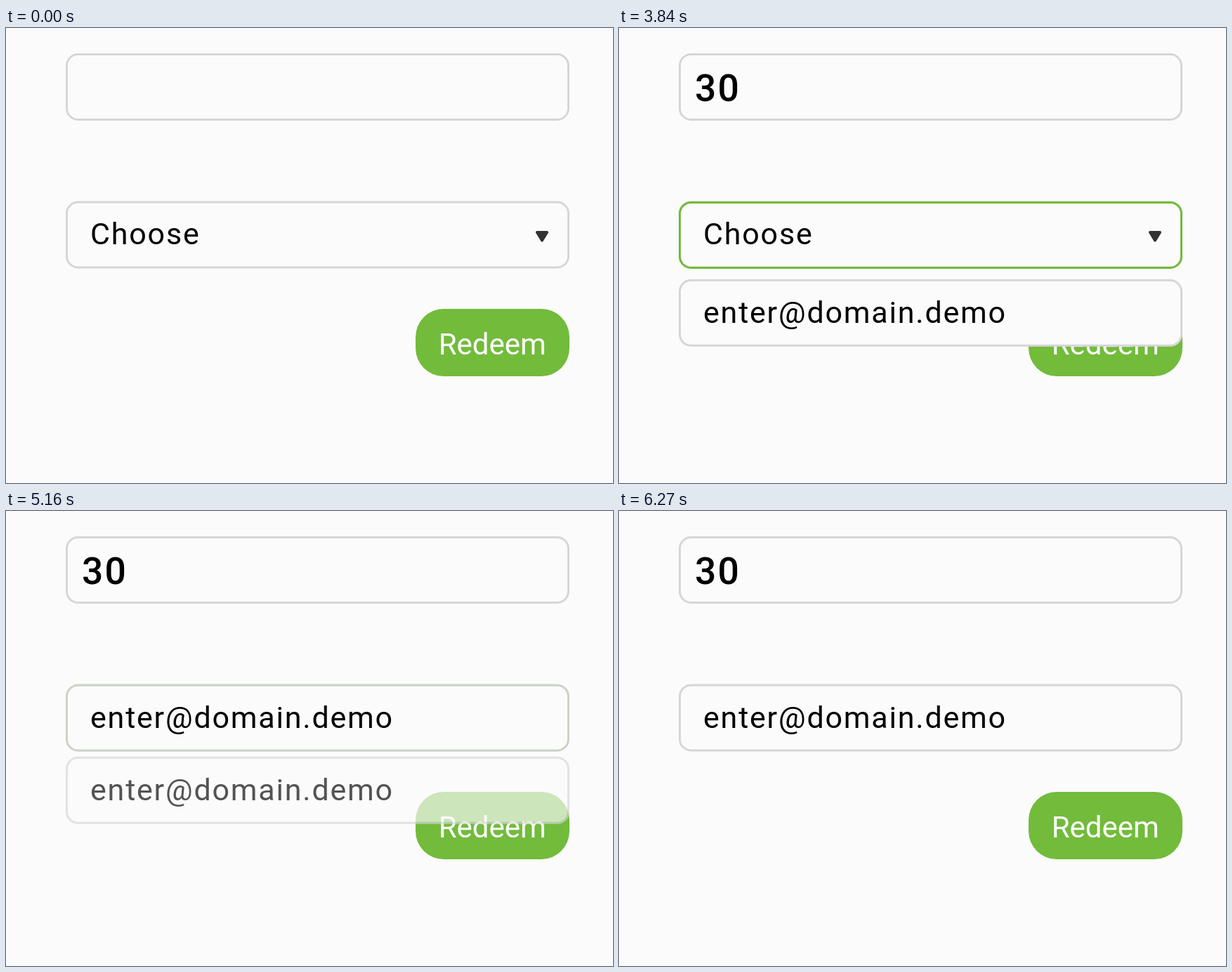
An HTML page that plays this animation: 864x648 px, repeating every 8.31 s.

```html
<!DOCTYPE html>
<html lang="en">
<head>
<meta charset="utf-8">
<title>Redeem form</title>
<style>
  html, body { margin: 0; width: 100%; height: 100%; overflow: hidden; background: #fbfbfb; }
  svg { display: block; width: 100%; height: 100%; font-family: Roboto, sans-serif; }
  .box { x: 86.5px; width: 714px; height: 93px; rx: 16px; fill: #fbfbfb; stroke: #d6d6d6; stroke-width: 3px; }
  .label { font-size: 43px; letter-spacing: 1.8px; }
  #amount { font-size: 53.5px; font-weight: 500; letter-spacing: 2.2px; }
  #button text { font-size: 42px; fill: #fff; text-anchor: middle; }
</style>
</head>
<body>
<svg viewBox="0 0 864 648">
  <rect class="box" y="37.5"/>
  <text id="amount" x="108" y="103.5"></text>

  <rect class="box" y="248"/>
  <rect class="box" id="focus" y="248.4" style="fill:none;stroke:#72bb3b"/>
  <g id="prompt">
    <text class="label" x="120" y="308">Choose</text>
    <path d="M756 291H770L763 302.5Z" fill="#333" stroke="#333" stroke-width="4" stroke-linejoin="round"/>
  </g>
  <text class="label" id="chosen" x="120" y="309">enter@domain.demo</text>

  <g id="button">
    <rect x="583" y="400" width="219" height="96" rx="40" fill="#72bb3b"/>
    <text x="692.3" y="465">Redeem</text>
  </g>

  <g id="panel">
    <rect class="box" id="option" y="359.3"/>
    <text class="label" id="optionText" x="120" y="420">enter@domain.demo</text>
  </g>
</svg>
<script>
const LOOP = 8310;
const $ = id => document.getElementById(id);
const ramp = (t, from, to) => Math.min(1, Math.max(0, (t - from) / (to - from)));
const mix = (a, b, k) => `rgb(${a.map((v, i) => Math.round(v + (b[i] - v) * k))})`;

function draw(t) {
  $('amount').textContent = t < 2370 ? '' : t < 2460 ? '3' : '30';

  // Dropdown: eases out on opening, eases in on closing
  const open = 1 - (1 - ramp(t, 3570, 3840)) ** 2;
  const shown = open - ramp(t, 5040, 5250) ** 2;
  $('panel').setAttribute('opacity', shown);
  $('panel').setAttribute('transform', `translate(0 ${-24 * (1 - shown)})`);
  $('focus').setAttribute('opacity', ramp(t, 3570, 3750) - ramp(t, 5040, 5175));

  // Option highlight
  const hot = ramp(t, 4830, 4950) - ramp(t, 4950, 5070);
  $('option').style.fill = mix([251, 251, 251], [59, 147, 229], hot);
  $('optionText').style.fill = mix([0, 0, 0], [255, 255, 255], hot);

  const picked = ramp(t, 5040, 5130);
  $('prompt').setAttribute('opacity', 1 - picked);
  $('chosen').setAttribute('opacity', picked);

  // Button pulse
  const near = Math.max(0, 1 - Math.abs(t - 5930) / 345);
  const scale = 1 + 0.09 * near ** 3.5;
  $('button').setAttribute('transform', `translate(692.5 448) scale(${scale}) translate(-692.5 -448)`);
}

const start = performance.now();
function tick() {
  draw((performance.now() - start) % LOOP);
  requestAnimationFrame(tick);
}
tick();
</script>
</body>
</html>
```
